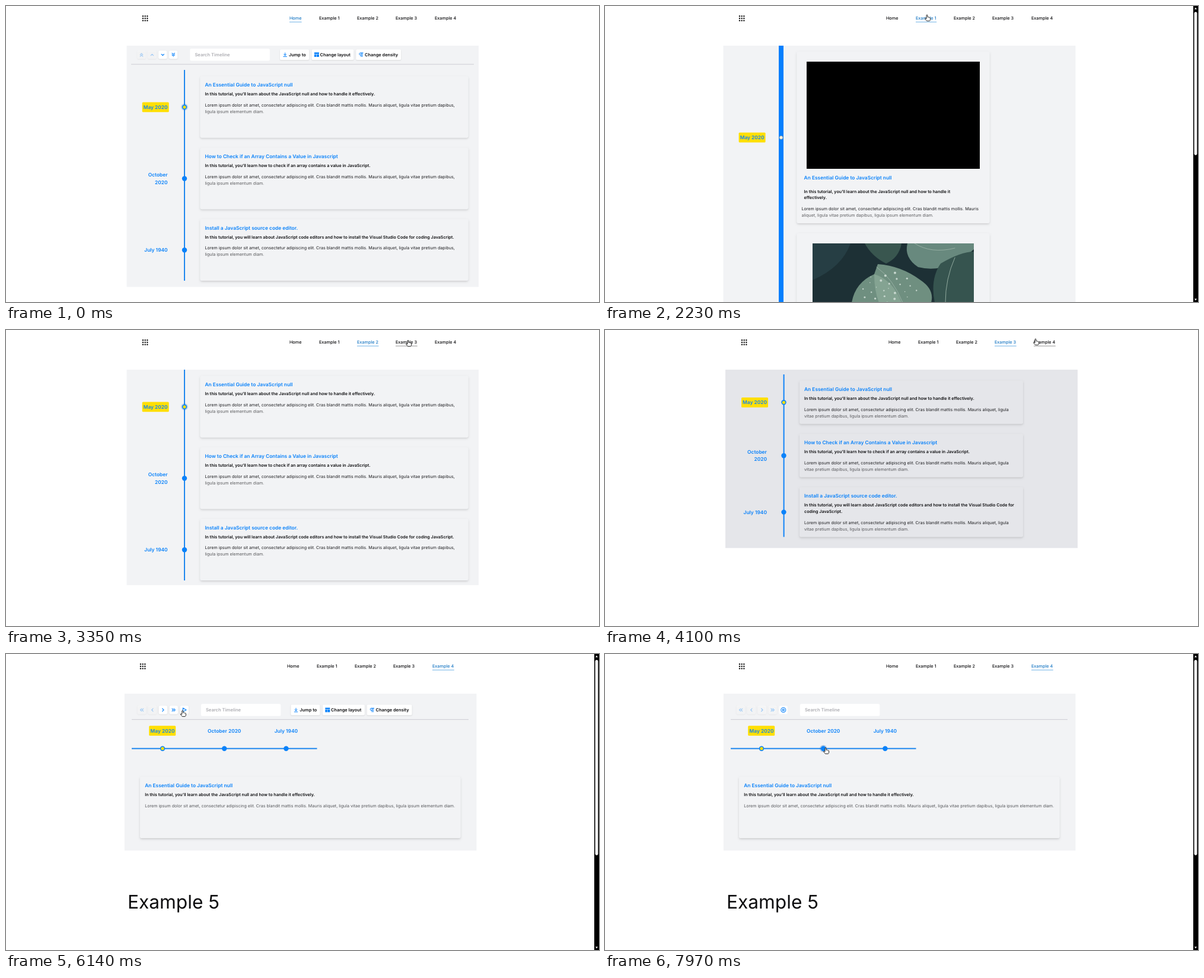
Write an HTML page with a canvas that moves like this. It is 1000 px wide and 500 px high and loops after 8 s.

```html
<!DOCTYPE html>
<html lang="en">
<head>
<meta charset="utf-8">
<title>Timeline examples</title>
<style>
  html, body { margin: 0; width: 100%; height: 100%; overflow: hidden; background: #fff; }
  canvas { display: block; width: 1000px; height: 500px; }
</style>
</head>
<body>
<canvas id="stage"></canvas>
<script>
const LOOP = 8000;
const BLUE = '#0a82fa', YELLOW = '#ffdf05', LIGHT = '#f2f3f5', GREY = '#e5e6ea', INK = '#0c0c0e';
const BODY = 7.11, TITLE = 8.38, LABEL = 7.36;
const canvas = document.getElementById('stage');
const ctx = canvas.getContext('2d');
const dpr = window.devicePixelRatio || 1;
canvas.width = 1000 * dpr;
canvas.height = 500 * dpr;
ctx.textRendering = 'geometricPrecision';

const LOREM = ['Lorem ipsum dolor sit amet, consectetur adipiscing elit. Cras blandit mattis mollis.',
  'Mauris aliquet, ligula', 'vitae pretium dapibus,', 'ligula ipsum elementum diam.'];
const LOREM_WIDE = [LOREM.slice(0, 3).join(' '), LOREM[3]];
const LOREM_MID = [LOREM.slice(0, 2).join(' '), LOREM.slice(2).join(' ')];
const ITEMS = [
  { date: ['May 2020'], title: 'An Essential Guide to JavaScript null',
    sub: ['In this tutorial, you’ll learn about the JavaScript null and how to handle it effectively.'] },
  { date: ['October', '2020'], title: 'How to Check if an Array Contains a Value in Javascript',
    sub: ['In this tutorial, you’ll learn how to check if an array contains a value in JavaScript.'] },
  { date: ['July 1940'], title: 'Install a JavaScript source code editor.',
    sub: ['In this tutorial, you will learn about JavaScript code editors and how to install the Visual Studio Code for',
      'coding JavaScript.'] }
];

// ---- helpers ----
const clamp = v => Math.max(0, Math.min(1, v));
const ease = p => p * p * (3 - 2 * p);

function text(str, x, mid, size, weight = 400, color = INK, align = 'left') {
  ctx.font = `${weight} ${size}px Inter, sans-serif`;
  ctx.fillStyle = color;
  ctx.textAlign = align;
  ctx.fillText(str, x, mid + size * 0.36);
}

function rect(x, y, w, h, color) {
  ctx.fillStyle = color;
  ctx.fillRect(x, y, w, h);
}

function round(x, y, w, h, r, color) {
  ctx.beginPath();
  ctx.roundRect(x, y, w, h, r);
  ctx.fillStyle = color;
  ctx.fill();
}

function circle(x, y, r, color) {
  ctx.beginPath();
  ctx.arc(x, y, r, 0, 7);
  ctx.fillStyle = color;
  ctx.fill();
}

function stroke(path, x, y, color, width = 1) {
  ctx.save();
  ctx.translate(x, y);
  ctx.lineWidth = width;
  ctx.strokeStyle = color;
  ctx.lineCap = ctx.lineJoin = 'round';
  ctx.stroke(new Path2D(path));
  ctx.restore();
}

function shaded(alpha, blur, dy, draw) {
  ctx.save();
  ctx.shadowColor = `rgba(0,0,0,${alpha})`;
  ctx.shadowBlur = blur * dpr;
  ctx.shadowOffsetY = dy * dpr;
  draw();
  ctx.restore();
}

// ---- page parts ----
const NAV = [['Home', 478, 20.6], ['Example 1', 528, 35.2], ['Example 2', 592, 36.5],
  ['Example 3', 657, 36.7], ['Example 4', 723, 36.8]];

function nav(active, shift, cur) {
  for (let i = 0; i < 9; i++)
    round(229.8 + shift + (i % 3) * 3.7, 16 + Math.floor(i / 3) * 3.7, 2.3, 2.3, 0.7, '#111');
  NAV.forEach(([label, left, w], i) => {
    const x = left + shift;
    const over = cur && cur.y < 30 && cur.x >= x && cur.x <= x + w;
    text(label, x - 0.1, 20.7, 7.28, 500, i === active ? '#1a78c4' : INK);
    if (i === active || over) rect(x, 26.6, w, 0.9, i === active ? '#5fa9e4' : '#8a8a8a');
  });
}

function scrollbar(end) {
  rect(992, 0, 8, 500, '#000');
  round(993.6, 10, 4.8, end - 10, 2.4, '#fff');
  ctx.fillStyle = '#fff';
  ctx.fill(new Path2D('M996 2.5L998 5.5H994ZM996 497.5L998 494.5H994Z'));
}

function cardBox(x, y, w, h, bg) {
  shaded(0.15, 3.5, 1.8, () => round(x, y, w, h, 3, bg));
  round(x, y, w, h, 3, bg);
}

function veil(x, y, w, bg) {
  const g = ctx.createLinearGradient(0, y, 0, y + 11);
  g.addColorStop(0, bg + '18');
  g.addColorStop(1, bg + '78');
  rect(x, y, w, 11, g);
}

function card(item, x, y, w, h, bg, sub, lorem) {
  cardBox(x, y, w, h, bg);
  const left = x + 8;
  text(item.title, left, y + 14.7, TITLE, 600, BLUE);
  sub.forEach((s, i) => text(s, left, y + 30.2 + i * 10.8, BODY, 600));
  const top = y + 49 + (sub.length - 1) * 10.8;
  lorem.forEach((s, i) => text(s, left, top + i * 10.9, BODY, 400, '#1c1c1f'));
  veil(left, top + (lorem.length - 1) * 10.9 - 5, w - 16, bg);
}

function dot(x, y, active, glow = 0) {
  if (glow) circle(x, y, 6, `rgba(40,110,190,${glow})`);
  circle(x, y, 4.2, BLUE);
  if (active) circle(x, y, 2.6, YELLOW);
}

function badge(x, y) {
  round(x, y, 45, 16.8, 1.6, YELLOW);
}

function dateLabel(item, x, y) {
  item.date.forEach((s, i) =>
    text(s, x, y + (i - (item.date.length - 1) / 2) * 12.2, TITLE, 600, BLUE, 'right'));
}

function arrowButton(x, y, path, alpha) {
  ctx.save();
  ctx.globalAlpha = 0.35 + alpha * 0.65;
  shaded(0.12, 2, 0.6, () => round(x - 7.2, y - 7.2, 14.4, 14.4, 2.5, '#fff'));
  ctx.globalAlpha = alpha;
  stroke(path, x, y, BLUE, 1.2);
  ctx.restore();
}

function toolButton(x, y, w, label, labelX, icon) {
  shaded(0.14, 2, 0.7, () => round(x, y - 9, w, 18, 2, '#fff'));
  icon(x + 9, y);
  text(label, labelX - 0.4, y, LABEL, 600);
}

const jumpIcon = (x, y) => stroke('M0-3V1.5M-2-.5L0 1.5 2-.5M-2.8 3.3H2.8', x - 0.4, y, BLUE, 1);
const layoutIcon = (x, y) => {
  rect(x - 4.6, y - 3.8, 8, 2.6, BLUE);
  rect(x - 4.6, y - 0.6, 3.4, 4.4, BLUE);
  rect(x - 0.6, y - 0.6, 4, 4.4, BLUE);
};
const densityIcon = (x, y) => stroke('M3-3H-1.5A1.9 1.9 0 0 0-1.5 .8H-.5M-.4-3V3.4M1.6-3V3.4', x, y, BLUE, 1);

function tools(x, y) {
  toolButton(x, y, 49, 'Jump to', x + 15.3, jumpIcon);
  toolButton(x + 53.5, y, 71, 'Change layout', x + 68, layoutIcon);
  toolButton(x + 128.2, y, 76, 'Change density', x + 143.5, densityIcon);
}

function search(x, y) {
  round(x, y - 10.3, 134.5, 20.6, 2.5, '#fff');
  text('Search Timeline', x + 8.1, y, 7.6, 600, '#adadb2');
}

function divider(x, y, w) {
  rect(x, y, w, 0.9, '#cfcfd6');
  rect(x, y + 0.9, w, 1, 'rgba(0,0,0,.03)');
}

// ---- pages ----
const UP = 'M-2.2 1.2L0-1L2.2 1.2', DOWN = 'M-2.2-1.1L0 1.1L2.2-1.1';
const UP2 = 'M-2.2 0L0-2.2L2.2 0M-2.2 2.8L0 .6L2.2 2.8', DOWN2 = 'M-2.2 0L0 2.2L2.2 0M-2.2-2.8L0-.6L2.2-2.8';
const LEFT = 'M1.1-2.3L-1.2 0L1.1 2.3', RIGHT = 'M-1.1-2.3L1.2 0L-1.1 2.3';
const LEFT2 = 'M-.3-2.2L-2.5 0L-.3 2.2M2.6-2.2L.4 0L2.6 2.2', RIGHT2 = 'M.3-2.2L2.5 0L.3 2.2M-2.6-2.2L-.4 0L-2.6 2.2';

function wideList(top) {
  rect(300, top - 10.5, 2, 356, '#1f87ee');
  badge(229.7, top + 44);
  ITEMS.forEach((item, i) => {
    const y = top + i * 120.7;
    card(item, 327.5, y, 452, 104, LIGHT, [item.sub.join(' ')], LOREM_WIDE);
    dot(301, y + 52.3, i === 0, i === 0 ? 0.22 : 0);
    dateLabel(item, 272.6, y + 52.3);
  });
}

function homePage() {
  rect(203.5, 67, 593.5, 407.5, LIGHT);
  [UP2, UP, DOWN, DOWN2].forEach((p, i) => arrowButton(228.5 + i * 17.9, 82.4, p, i < 2 ? 0.35 : 1));
  search(310.3, 82.3);
  tools(462, 82.2);
  divider(211, 97.8, 578);
  wideList(118.5);
}

function leafPhoto(x, y, w, h) {
  ctx.save();
  ctx.beginPath();
  ctx.rect(x, y, w, h);
  ctx.clip();
  ctx.translate(x, y);
  const shape = (path, color) => {
    ctx.fillStyle = color;
    ctx.fill(new Path2D(path));
  };
  rect(0, 0, w, h, '#1d3035');
  shape('M0 0H64Q50 40 0 62Z', '#263e44');
  shape('M88 0H150Q146 24 124 34Q100 22 88 0Z', '#39564f');
  shape('M160 0H272V10Q226 52 178 40Q154 24 160 0Z', '#68897e');
  shape('M216 34Q250 14 272 14V100H206Q198 60 216 34Z', '#36544f');
  shape('M66 100Q72 66 104 52L110 35Q150 38 182 62Q206 78 200 100Z', '#6f8f80');
  shape('M104 52Q136 62 150 100H112Q104 80 104 52Z', '#84a392');
  stroke('M172 0Q200 18 240 8M108 40Q136 60 152 100M240 24Q224 60 224 100', 0, 0, '#9ab3a6', 0.9);
  for (let i = 0; i < 24; i++) {
    const a = i * 2.4, r = 8 * Math.sqrt(i);
    circle(128 + r * Math.cos(a) * 1.3, 76 + r * Math.sin(a) * 0.7, 0.8 + (i % 4) * 0.4, '#c6d6cd');
  }
  ctx.restore();
}

function mediaPage() {
  rect(199.5, 67, 594, 433, LIGHT);
  rect(293, 67, 8, 433, '#057ffd');
  badge(225.6, 213.7);
  dateLabel(ITEMS[0], 268.6, 222.3);
  circle(297, 222.3, 3.3, '#8a9aa5');
  circle(297, 222.3, 2.5, '#f3f1e4');
  cardBox(323.5, 77, 325, 290, LIGHT);
  rect(340, 94, 292, 181, '#000');
  text(ITEMS[0].title, 335.6, 289.5, TITLE, 600, BLUE);
  const cut = ITEMS[0].sub[0].lastIndexOf(' ');
  text(ITEMS[0].sub[0].slice(0, cut), 335.6, 313.2, BODY, 600);
  text(ITEMS[0].sub[0].slice(cut + 1), 335.6, 323.6, BODY, 600);
  text(LOREM[0] + ' Mauris', 331.5, 342.8, BODY, 400, '#1c1c1f');
  text('aliquet, ligula ' + LOREM[2] + ' ' + LOREM[3], 331.5, 353.3, BODY, 400, '#1c1c1f');
  veil(331.5, 348, 308, LIGHT);
  cardBox(323.5, 384, 325, 140, LIGHT);
  leafPhoto(350, 401, 272, 99);
  scrollbar(252);
}

function plainPage() {
  rect(203.5, 67, 593.5, 364, LIGHT);
  wideList(77.5);
}

function compactPage() {
  rect(203, 67, 594, 301.3, GREY);
  rect(300.6, 75, 2, 274.5, '#0f83f8');
  badge(230, 114);
  const rows = [[85.5, 73, 122.3], [175.5, 73, 212.3], [265.5, 84, 307.6]];
  rows.forEach(([y, h, mid], i) => {
    card(ITEMS[i], 328, y, 377, h, GREY, ITEMS[i].sub, LOREM_MID);
    dot(301.5, mid, i === 0);
    dateLabel(ITEMS[i], 272.9, mid);
  });
}

function playButton(x, y, playing, ring) {
  if (!playing) {
    arrowButton(x, y, 'M-2.4-3.3L3.2 0L-2.4 3.3Z', 1);
    return;
  }
  round(x - 7, y - 7, 14, 14, 2.5, '#fff');
  if (ring) {
    ctx.beginPath();
    ctx.roundRect(x - 7, y - 7, 14, 14, 3);
    ctx.strokeStyle = `rgba(40,135,225,${ring})`;
    ctx.lineWidth = 1.2;
    ctx.stroke();
  }
  ctx.beginPath();
  ctx.arc(x, y, 4, 0, 7);
  ctx.strokeStyle = BLUE;
  ctx.lineWidth = 1.1;
  ctx.stroke();
  ctx.strokeRect(x - 1.3, y - 1.3, 2.6, 2.6);
}

function slideCard(t, playing) {
  const p = playing ? ease(clamp((t - PLAY) / 530)) : 1;
  const s = 0.97 + 0.03 * p;
  ctx.save();
  ctx.translate(496.2, 259.3);
  ctx.scale(s, s);
  ctx.translate(-496.2, -259.3);
  cardBox(226, 207.3, 540.5, 103.8, LIGHT);
  if (playing) {
    const fade = 1 - clamp((t - 6800) / 250);
    ctx.beginPath();
    ctx.roundRect(226, 207.3, 540.5, 103.8, 4);
    ctx.lineWidth = 1;
    ctx.strokeStyle = `rgba(90,92,98,${0.85 * fade})`;
    if (fade) ctx.stroke();
  }
  ctx.globalAlpha = 0.4 + 0.6 * p;
  text(ITEMS[0].title, 234.2, 222, TITLE, 600, BLUE);
  text(ITEMS[0].sub[0], 234.2, 237.5, BODY, 600);
  text(LOREM.join(' '), 234.2, 256, BODY, 400, '#55565a');
  ctx.restore();
}

function slidePage(t, cur) {
  const playing = t >= PLAY;
  const dim = playing ? 0.42 : 1;
  rect(199.8, 67, 593.7, 265, LIGHT);
  [LEFT2, LEFT, RIGHT, RIGHT2].forEach((p, i) =>
    arrowButton(229 + i * 17.9, 94.5, p, i < 2 ? 0.35 : dim));
  playButton(300.8, 94.5, playing, 1 - clamp((t - 7000) / 200));
  search(328.8, 94.5);
  if (!playing) tools(480.4, 94.5);
  divider(212, 110, 568);
  badge(241.2, 121.2);
  rect(212, 158.7, 312.5, 2, '#1f87ee');
  ITEMS.forEach((item, i) => {
    const x = 264 + i * 104.2;
    const over = Math.hypot(cur.x - x, cur.y - 159.7) < 7;
    text(item.date.join(' '), x, 129.7, TITLE, 600, BLUE, 'center');
    dot(x, 159.7, i === 0, over ? 0.35 : i === 0 && playing && t < 7300 ? 0.25 : 0);
  });
  slideCard(t, playing);
  text('Example 5', 205, 418.7, 31.68);
  scrollbar(340);
}

// ---- pointer ----
const PLAY = 6400;
const MOVES = [[490, 600, 430], [1250, 543, 14.6], [2240, 543, 14.6], [2700, 614, 17], [2890, 614, 17],
  [3330, 678, 17], [3500, 678, 17], [4050, 726, 14.6], [4120, 726, 14.6], [4250, 737, 16],
  [4420, 737, 16], [5220, 308.5, 108], [5300, 308.5, 108], [5500, 297.7, 95], [6950, 297.7, 95], [7600, 372, 158]];
const HAND = new Path2D('M-1 1Q0-.6 1 1V4.2Q2 3.6 2.7 4.5Q3.7 4 4.3 5Q5.6 4.8 5.6 6V8Q5.4 10 4.4 10.6H-.4Q-2 9-3.6 6.6Q-3.2 5.4-1 7Z');
const ARROW = new Path2D('M0 0V8L1.9 6.3 3.1 9 4.4 8.4 3.2 5.8H5.8Z');

function pointerAt(t) {
  if (t < MOVES[0][0]) return null;
  const i = MOVES.findIndex(m => m[0] > t);
  if (i < 0) return { x: 372, y: 158 };
  const [t0, x0, y0] = MOVES[i - 1], [t1, x1, y1] = MOVES[i];
  const p = ease((t - t0) / (t1 - t0));
  return { x: x0 + (x1 - x0) * p, y: y0 + (y1 - y0) * p };
}

function pointer({ x, y }, onSlides) {
  const hand = y < 30 || onSlides &&
    (Math.hypot(x - 300, y - 96) < 8 || Math.hypot(x - 368, y - 160) < 8);
  ctx.save();
  ctx.translate(x, y);
  ctx.lineJoin = 'round';
  ctx.lineWidth = 0.9;
  ctx.fillStyle = hand ? '#fff' : '#000';
  ctx.strokeStyle = hand ? '#111' : '#fff';
  const shape = hand ? HAND : ARROW;
  ctx.fill(shape);
  ctx.stroke(shape);
  ctx.restore();
}

// ---- schedule ----
const PAGES = [homePage, mediaPage, plainPage, compactPage, slidePage];
const CLICKS = [2230, 2880, 3480, 4320];

function frame(now) {
  const t = now % LOOP;
  const page = CLICKS.filter(c => t >= c).length;
  const cur = pointerAt(t);
  ctx.setTransform(dpr, 0, 0, dpr, 0, 0);
  rect(0, 0, 1000, 500, '#fff');
  nav(page, page === 1 || page === 4 ? -4 : 0, cur);
  PAGES[page](t, cur);
  if (cur) pointer(cur, page === 4);
  requestAnimationFrame(frame);
}
requestAnimationFrame(frame);
</script>
</body>
</html>
```
